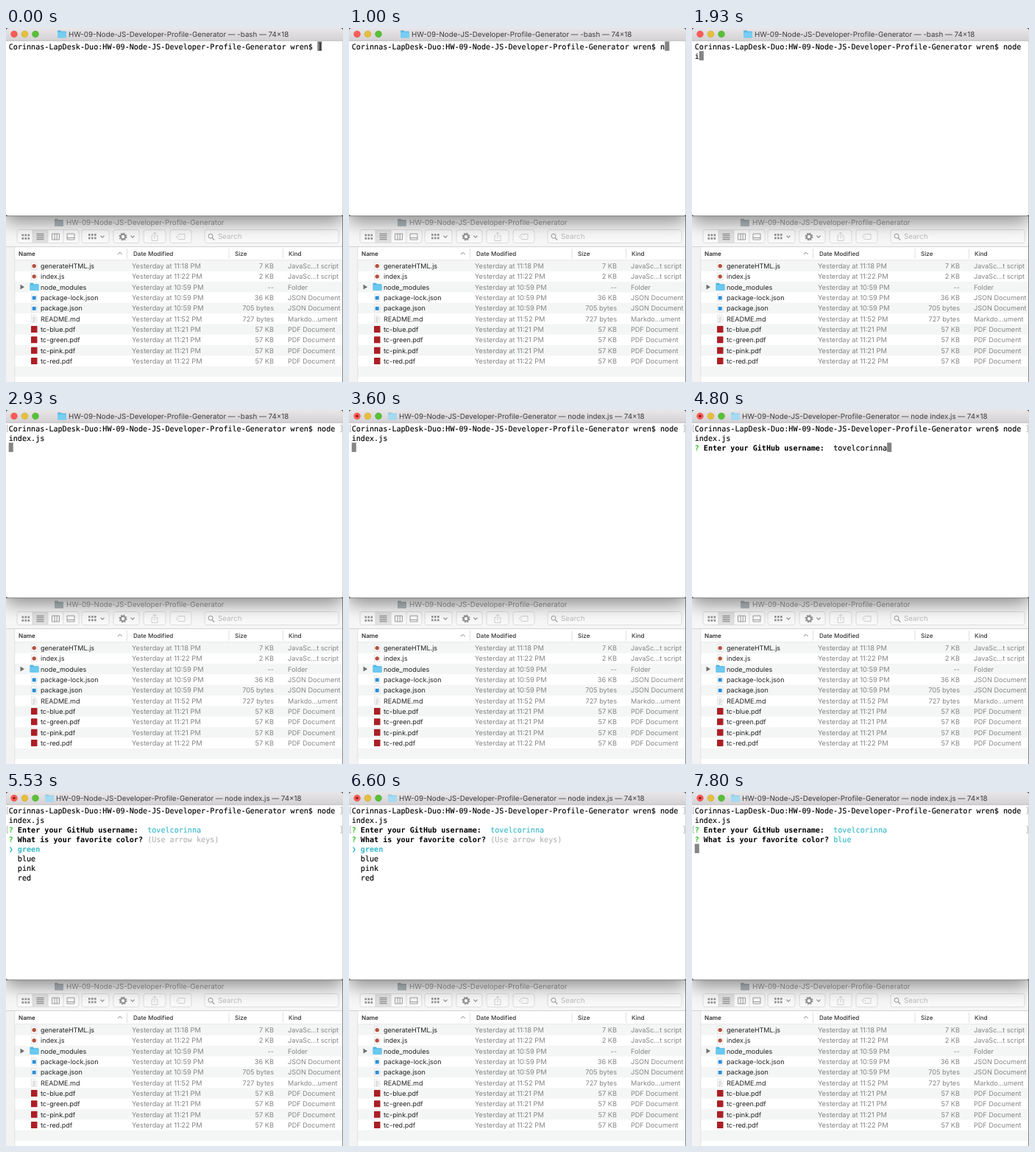
An HTML page that plays this animation: 458x480 px, repeating every 8 s.

```html
<!DOCTYPE html>
<html lang="en">
<head>
<meta charset="utf-8">
<title>Profile generator session</title>
<style>
  html, body { margin: 0; width: 100%; height: 100%; overflow: hidden; background: #fff; }
  svg { display: block; width: 458px; height: 480px; }
  text { white-space: pre; text-rendering: geometricPrecision; }
  .ui { font-family: Inter, "Open Sans", sans-serif; }
  .term { font: 10.1px "DejaVu Sans Mono", "Liberation Mono", monospace; }
</style>
</head>
<body>
<svg id="stage" viewBox="0 0 458 480">
  <defs>
    <linearGradient id="bar" x2="0" y2="1">
      <stop stop-color="#e8e6e8"/><stop offset="1" stop-color="#d3d1d3"/>
    </linearGradient>
    <filter id="blur" filterUnits="userSpaceOnUse" x="-60" y="150" width="580" height="200">
      <feGaussianBlur stdDeviation="12"/>
    </filter>
  </defs>
  <g id="finder" class="ui"></g>
  <g id="window" class="ui"></g>
  <g id="screen" class="term"></g>
</svg>
<script>
const LOOP = 8000;
const PROJECT = 'HW-09-Node-JS-Developer-Profile-Generator';
const PROMPT = `Corinnas-LapDesk-Duo:${PROJECT} wren$ `;
const USER = 'tovelcorinna';
const CELL = 6.08, LINE = 13, LEFT = 3.7, TOP = 18;
const CYAN = '#35b9c6', GREEN = '#35c42e', GREY = '#b4b4b4', INK = '#000';

const $ = id => document.getElementById(id);
const rect = (x, y, w, h, fill, more = '') =>
  `<rect x="${x}" y="${y}" width="${w}" height="${h}" fill="${fill}" ${more}/>`;
const circle = (x, y, r, fill, more = '') =>
  `<circle cx="${x}" cy="${y}" r="${r}" fill="${fill}" ${more}/>`;
const path = (d, stroke, width = 1, fill = 'none') =>
  `<path d="${d}" stroke="${stroke}" stroke-width="${width}" fill="${fill}"/>`;
const label = (x, y, str, size, fill, more = '') =>
  `<text x="${x}" y="${y}" font-size="${size}" fill="${fill}" ${more}>${str}</text>`;
const folder = (x, y, back, front) =>
  `<path d="M${x} ${y + 1}q0-1 1-1h3.2l1.3 1.4h5.5q1 0 1 1v6.6q0 1-1 1h-10q-1 0-1-1z" fill="${back}"/>` +
  rect(x, y + 2.5, 12, 7.5, front, 'rx=".8"');

// File list

const page = (x, y) =>
  path(`M${x} ${y}h5l2.5 2.5v7.5h-7.5z`, '#d0d0d0', .6, '#fff');

const icons = {
  js: y => page(34.5, y - 5) + circle(38.2, y + .2, 2.7, '#b5523f'),
  json: y => page(34.5, y - 5) + rect(35.7, y - 2, 5, 5, '#2b8fd6'),
  md: y => page(34.5, y - 5) +
    path(`M36 ${y - 2}h4M36 ${y}h4.5M36 ${y + 2}h4.5M36 ${y + 4}h3`, '#a9a9a9', .7),
  pdf: y => rect(34, y - 4.5, 8.5, 9, '#ab1f25', 'rx=".6"'),
  dir: y => path(`M19.5 ${y - 3.3}l5.5 3.3l-5.5 3.3z`, 'none', 0, '#6f6f6f') +
    folder(32.5, y - 5.3, '#4fb5e0', '#69c9f0')
};

const files = [
  ['js', 'generateHTML.js', '11:18', '7 KB', 'JavaSc...t script'],
  ['js', 'index.js', '11:22', '2 KB', 'JavaSc...t script'],
  ['dir', 'node_modules', '10:59', '--', 'Folder'],
  ['json', 'package-lock.json', '10:59', '36 KB', 'JSON Document'],
  ['json', 'package.json', '10:59', '705 bytes', 'JSON Document'],
  ['md', 'README.md', '11:52', '727 bytes', 'Markdo...ument'],
  ...[['blue', '11:21'], ['green', '11:21'], ['pink', '11:21'], ['red', '11:22']]
    .map(([color, time]) => ['pdf', `tc-${color}.pdf`, time, '57 KB', 'PDF Document'])
];

function fileRow([icon, name, time, size, kind], i) {
  const mid = 322.5 + i * 14.33, base = mid + 3.4;
  return icons[icon](mid) +
    label(47, base, name, 9, '#222') +
    label(171, base, `Yesterday at ${time} PM`, 9.3, '#858585') +
    label(364, base, size, 9.2, '#858585', 'text-anchor="end"') +
    label(383, base, kind, 9.1, '#858585');
}

function toolbar() {
  const box = (x, w) => rect(x, 273.5, w, 18, '#f9f9f9', 'rx="3" stroke="#d6d6d6" stroke-width=".8"');
  const dot = '#939393', pale = '#cbcbcb';
  let out = box(15, 84) + rect(36, 274, 21, 17.2, '#e0e0e0');
  for (const x of [36, 57, 78]) out += path(`M${x} 274v17`, '#d6d6d6', .8);
  for (const x of [21.5, 25.5, 29.5])
    for (const y of [279.5, 284]) out += rect(x, y, 2.6, 2.8, dot);
  out += path('M41.5 279.3h10M41.5 281.8h10M41.5 284.3h10M41.5 286.8h10', '#777', 1.1);
  out += path('M62.5 279h10v8h-10zM66 279v8M69.2 279v8', dot, .9);
  out += path('M83 279h10v8h-10zM83 284.5h10', dot, .9);
  out += box(103, 37);
  for (const x of [112, 116, 120])
    for (const y of [279, 283.5]) out += rect(x, y, 2.6, 2.8, dot);
  out += path('M128.5 281.5l2.5 2.6l2.5-2.6', dot, 1.1);
  out += box(146, 35) + circle(159, 283, 3.3, 'none', `stroke="${dot}" stroke-width="2.2"`) +
    circle(159, 283, 4.8, 'none', `stroke="${dot}" stroke-width="1.5" stroke-dasharray="1.9 1.87"`) +
    path('M169.5 281.5l2.5 2.6l2.5-2.6', dot, 1.1);
  out += box(187, 30) +
    path('M200 281.5h-2v7h8v-7h-2M202 285.5v-8.5M199.5 279.5l2.5-2.5l2.5 2.5', pale, .9);
  out += box(223, 29) + path('M231.5 283l3-3.5h8.5v7h-8.5z', pale, .9) + circle(235.3, 283, .7, pale);
  out += box(270, 182) + circle(278, 282.2, 3, 'none', 'stroke="#999"') +
    path('M280.2 284.5l3 3', '#999', 1.1) + label(288, 286.3, 'Search', 9.8, '#bcbcbc');
  return out;
}

function drawFinder() {
  let out = rect(0, 255, 458, 42, '#f6f6f6') + toolbar() +
    rect(0, 297, 12, 183, '#f3f3f3') + rect(12, 297, 446, 183, '#fff');
  for (let y = 315.4; y < 480; y += 28.66) out += rect(12, y, 446, 14.33, '#f4f5f5');
  out += path('M0 296.6h458', '#d2d2d2') + path('M12 314.8h446M11.8 297v183', '#dcdcdc', .8);
  for (const x of [164.5, 303, 376.5]) out += path(`M${x} 299v14`, '#d8d8d8', .8);
  for (const [x, head] of [[17, 'Name'], [173, 'Date Modified'], [311, 'Size'], [384, 'Kind']])
    out += label(x, 308.7, head, 8.1, '#333', `font-weight="${head === 'Name' ? 600 : 500}"`);
  out += path('M152 307l2.8-2.8l2.8 2.8', '#777', .9);
  out += files.map(fileRow).join('');
  out += folder(66, 258.7, '#a9b2b7', '#b3bcc1') + label(82, 267.2, PROJECT, 9.77, '#949494');
  out += rect(457.2, 255, .8, 225, '#6a6a6a');
  out += rect(0, 150, 458, 113, '#000', 'opacity=".43" filter="url(#blur)"');
  $('finder').innerHTML = out;
}

// Terminal

function drawWindow(running) {
  const x = running ? 53 : 70;
  const job = running ? 'node index.js' : '-bash';
  const lights = ['#fc5b57', '#e5bf3c', '#57c038']
    .map((c, i) => circle(11 + i * 14.5, 8.3, 4.6, c, 'stroke="#000" stroke-opacity=".12" stroke-width=".6"'));
  // A busy shell dims the folder and marks the close button
  const proxy = running ? folder(x, 3.2, '#93cfea', '#a5daf2') : folder(x, 3.2, '#5cb9e2', '#76cdf2');
  $('window').innerHTML =
    rect(0, 0, 458, 8, '#4b5040') + rect(0, 250, 458, 5.2, '#55564f') +
    `<path d="M0 17.5V4q0-4 4-4h450q4 0 4 4v13.5z" fill="url(#bar)"/>` +
    `<path d="M0 17.5h458V251.5q0 3-3 3H3q-3 0-3-3z" fill="#fff"/>` +
    path('M0 17.3h458', '#b9b7b9', .8) + path('M457.7 18v234', '#b0b0b0', .6) +
    lights.join('') + (running ? circle(11, 8.3, 1.7, '#8c1a14') : '') + proxy +
    label(x + 15, 12.4, `${PROJECT} — ${job} — 74×18`, 9.75, '#3c3c3c');
}

const put = (col, row, str, fill = INK, bold = false) =>
  `<text x="${LEFT + col * CELL}" y="${TOP + row * LINE + 11}" fill="${fill}" ` +
  (bold ? 'font-weight="700"' : `stroke="${fill}" stroke-width=".14"`) + `>${str}</text>`;
const caret = (col, row) => rect(LEFT + col * CELL, TOP + row * LINE + .3, CELL, LINE - .4, '#858585');
const marks = row => {
  const y = TOP + row * LINE + 2.6;
  return path(`M3.2 ${y}h-1.7v9h1.7M454.5 ${y}h1.7v9h-1.7`, '#a8a8a8', .8);
};
const question = (row, str) => put(0, row, '?', GREEN, true) + put(2, row, str, INK, true);
const beam = () => path('M425.3 19.8q1.8 0 1.8 1.5v7.4q0 1.5-1.8 1.5M428.9 19.8q-1.8 0-1.8 1.5v7.4q0 1.5 1.8 1.5', '#222', 1);

// Keystrokes of the command; tab completes the file name
const typing = [[0, ''], [1000, 'n'], [1330, 'no'], [1470, 'nod'], [1600, 'node'],
  [1730, 'node '], [1930, 'node i'], [2270, 'node index.js ']];
const ENTER = 2930, TITLE = 3000, ASK = 3870, PASTE = 4600, LIST = 5530, DOWN = 6670, PICK = 7070;
const colors = ['green', 'blue', 'pink', 'red'];

function choices(active) {
  return colors.map((name, i) => i === active
    ? put(0, 4 + i, '❯', CYAN, true) + put(2, 4 + i, name, CYAN, true)
    : put(2, 4 + i, name)).join('');
}

function screen(t) {
  const command = typing.filter(([at]) => at <= t).pop()[1];
  const tail = command.slice(5);
  let out = put(0, 0, PROMPT + command.slice(0, 5)) + put(0, 1, tail);
  if (t < ENTER) {
    const pos = PROMPT.length + command.length;
    return caret(pos % 74, Math.floor(pos / 74)) + out + (t < typing[1][0] ? beam() : '');
  }
  out += marks(0);
  if (t < ASK) return out + caret(0, 2);

  out += question(2, 'Enter your GitHub username:');
  if (t < PASTE) return out + caret(31, 2);
  out += put(31, 2, USER, t < LIST ? INK : CYAN);
  if (t < LIST) return out + caret(31 + USER.length, 2);

  out += marks(2) + question(3, 'What is your favorite color?');
  if (t < DOWN) return out + put(31, 3, '(Use arrow keys)', GREY) + choices(0);
  if (t < PICK) return out + choices(1);
  return out + put(31, 3, 'blue', CYAN) + caret(0, 4);
}

let shown = '', wasRunning = null;
function render(t) {
  const running = t >= TITLE;
  if (running !== wasRunning) drawWindow(wasRunning = running);
  const next = screen(t);
  if (next !== shown) $('screen').innerHTML = shown = next;
}

drawFinder();
render(0);
const start = performance.now();
(function tick() {
  render((performance.now() - start) % LOOP);
  requestAnimationFrame(tick);
})();
</script>
</body>
</html>
```
